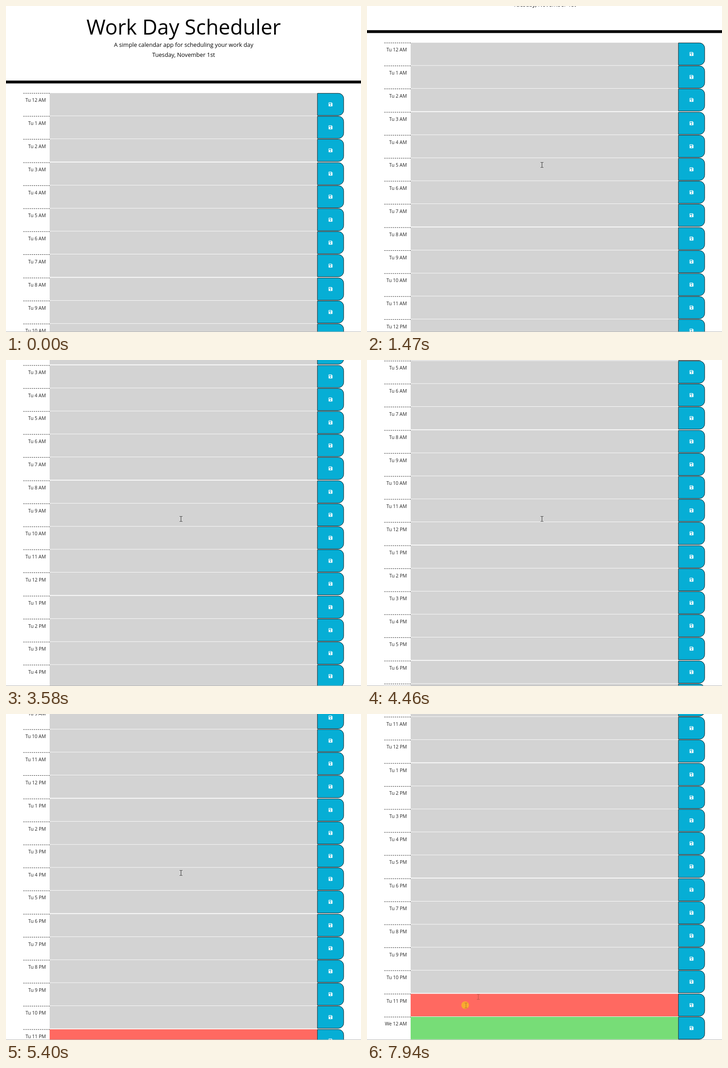
Recreate the animation shown at these times as an HTML page. Size 780 by 718 pixels, loop 8000 ms.

```html
<!DOCTYPE html>
<html lang="en">
<head>
<meta charset="utf-8">
<title>Work Day Scheduler</title>
<style>
  html, body { margin: 0; width: 100%; height: 100%; overflow: hidden; background: #fff; }
  #stage { position: relative; width: 780px; height: 718px; overflow: hidden;
    font-family: "Open Sans", sans-serif; color: #000; }
  #page { position: absolute; left: 0; top: 0; width: 880px; height: 1646px; transform-origin: 0 0; }
  #page > *, .row > * { position: absolute; box-sizing: border-box; }
  .head { left: 0; width: 879px; text-align: center; white-space: nowrap; font-size: 14.3px; line-height: 22px; }
  h1.head { top: 17px; margin: 0; font-size: 51.2px; font-weight: 400; line-height: 68px; }
  .rule { left: 0; top: 185px; width: 880px; height: 7px; background: #000; }
  .row { left: 43px; width: 793px; height: 57px; }
  .hour { left: 0; top: 0; width: 65px; height: 56px; padding: 5px 9.4px 0 0; text-align: right;
    white-space: nowrap; font-size: 11.7px; line-height: 22px; color: #222; border-top: 1px dashed #000; }
  .slot { left: 65px; top: 0; width: 662px; height: 56px; background: #d3d3d3; }
  .present { background: #ff6961; }
  .future { background: #77dd77; }
  .save { left: 727px; top: 0; width: 66px; height: 56px; background: #06aed5;
    border: 1px solid #000; border-radius: 0 13.5px 13.5px 0; }
  .save svg { position: absolute; left: 27px; top: 22px; }
  #edge { position: absolute; left: 0; top: 717px; width: 780px; height: 1px; background: #b4b4b4; }
  #overlay { position: absolute; left: 0; top: 0; }
</style>
</head>
<body>
<div id="stage">
  <div id="page">
    <h1 class="head">Work Day Scheduler</h1>
    <div class="head" style="top:85px">A simple calendar app for scheduling your work day</div>
    <div class="head" style="top:110px">Tuesday, November 1st</div>
    <div class="rule"></div>
  </div>
  <div id="edge"></div>
  <svg id="overlay" width="780" height="718">
    <defs>
      <path id="beam" d="M-3-5.5h2.5l.5.5.5-.5H3M0-5V5M-3 5.5h2.5L0 5l.5.5H3" fill="none"/>
    </defs>
    <circle id="click" cx="215.7" cy="641.3" r="8.4" fill="#f9a930"/>
    <use id="trail" href="#beam" x="244.5" y="623" stroke="#7a4030" stroke-opacity=".5"/>
    <use id="text" href="#beam"/>
    <path id="hand" d="M-1.5 0q1.5-1.5 3 0v4l5 1q1.5 .5 1 3l-1.5 5h-6l-4-5q0-2 2.5-.5z"
      fill="#fff" stroke="#000"/>
  </svg>
</div>
<script>
const LOOP = 8000;
const SCALE = 0.888; // page pixels to stage pixels
const $ = id => document.getElementById(id);

const icon = `<svg width="10" height="10" viewBox="0 0 9 9">
  <path fill="#fff" fill-rule="evenodd" d="M1 0h5.8L9 2.2V8q0 1-1 1H1Q0 9 0 8V1q0-1 1-1z
  M1.4 1.5v2h4.8v-2zM4.5 4.9a1.3 1.3 0 1 0 .01 0z"/></svg>`;

for (let i = 0; i < 25; i++) {
  const hour = i % 24;
  const name = `${i < 24 ? 'Tu' : 'We'} ${hour % 12 || 12} ${hour < 12 ? 'AM' : 'PM'}`;
  const kind = i < 23 ? '' : i === 23 ? 'present' : 'future';
  const row = document.createElement('div');
  row.className = 'row';
  row.style.top = 216 + i * 57.2 + 'px';
  row.innerHTML = `<div class="hour">${name}</div><div class="slot ${kind}"></div><div class="save">${icon}</div>`;
  $('page').append(row);
}

// start, end, number of steps, value reached
const scrolls = [
  [1340, 1470, 3, 125], [2400, 2650, 5, 250], [3330, 3580, 5, 375],
  [4260, 4460, 4, 500], [4990, 5400, 7, 750], [5850, 6060, 4, 838]
];
const moves = [
  [110, 860, 12, [410, 423]], [930, 1070, 3, [384.5, 350]],
  [6920, 7140, 4, [339, 522]], [7210, 7211, 1, [339, 518]],
  [7390, 7660, 5, [244.5, 623]], [7730, 7800, 2, [217.5, 641.5]]
];

// The first step lands at the start time, the last at the end time.
function stepped(t, [from, to, n]) {
  if (t < from) return 0;
  return Math.min(n, Math.floor((t - from) / (to - from) * (n - 1) + 1.001)) / n;
}
const smooth = p => p * p * (3 - 2 * p);
const mix = (a, b, p) => a + (b - a) * p;

function draw(t) {
  let y = 0;
  for (const s of scrolls) y = mix(y, s[3], smooth(stepped(t, s)));
  $('page').style.transform = `scale(${SCALE}) translateY(${-Math.round(y)}px)`;

  let pos = [740, 727];
  for (const m of moves) {
    const p = stepped(t, m);
    pos = pos.map((v, i) => mix(v, m[3][i], p));
  }
  const cx = Math.floor(pos[0]) + 0.5;
  const cy = Math.round(pos[1]);
  const overButton = cx > 684;
  const onRed = t > 7000 && cy > 617;
  const show = (id, on) => $(id).style.display = on ? '' : 'none';
  show('hand', t >= 110 && overButton);
  show('text', t >= 110 && !overButton);
  show('trail', t >= 7730);
  show('click', t >= 7940);
  for (const id of ['hand', 'text']) $(id).setAttribute('transform', `translate(${cx} ${cy})`);
  $('text').setAttribute('stroke', onRed ? '#7a4030' : '#333');
  $('text').setAttribute('stroke-opacity', onRed ? 0.5 : 1);
}

const start = performance.now();
function tick() {
  draw((performance.now() - start) % LOOP);
  requestAnimationFrame(tick);
}
draw(0);
requestAnimationFrame(tick);
</script>
</body>
</html>
```
